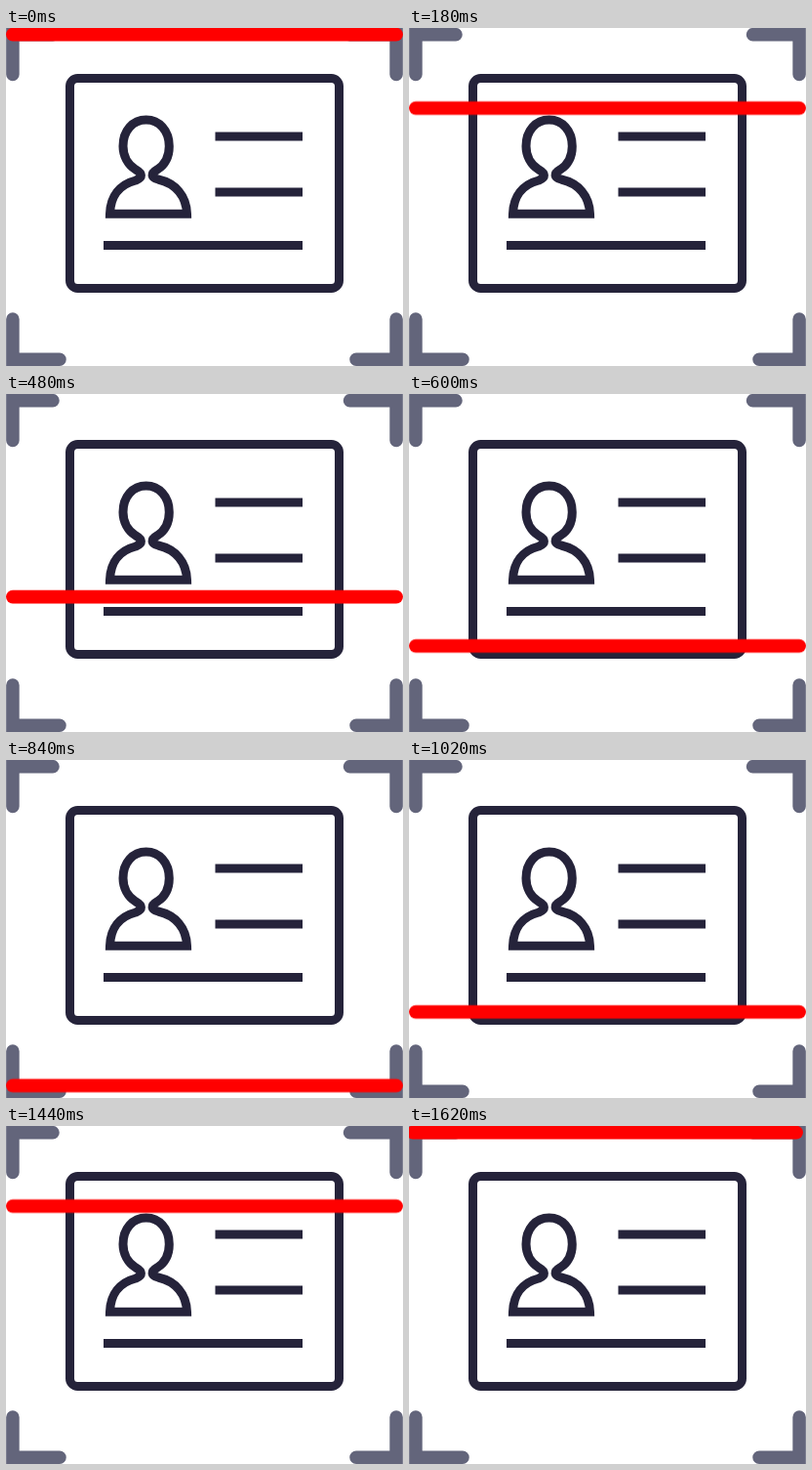
An HTML page for the animation above (1.65 s loop, 407x346 px).

```html
<!DOCTYPE html>
<html lang="en">
<head>
<meta charset="utf-8">
<title>ID card scan</title>
<style>
  html, body { margin: 0; width: 100%; height: 100%; overflow: hidden; background: #fff; }
  svg { display: block; width: 407px; height: 346px; }
  .corners, .card { fill: none; }
  .corners { stroke: #63657b; stroke-width: 13.5; stroke-linecap: round; }
  .card { stroke: #25233a; stroke-width: 9; }
  .beam { fill: #f00; animation: scan 1650ms infinite; }

  /* 27 steps down, 27 steps up, then one short rest nudged to the left */
  @keyframes scan {
    0% { transform: translate(0, 0); animation-timing-function: steps(27); }
    49.09% { transform: translate(0, 339.2px); animation-timing-function: steps(27); }
    98.18% { transform: translate(0, 0); animation-timing-function: step-start; }
    100% { transform: translate(-3px, 0); }
  }
</style>
</head>
<body>
<svg viewBox="0 0 407 346">
  <g class="corners">
    <path d="M48 6.7H6.9V47.5"/>
    <path d="M352.5 6.7H400.1V47.5"/>
    <path d="M6.9 298V339.2H55"/>
    <path d="M400.1 298V339.2H359"/>
  </g>
  <g class="card">
    <rect x="65.5" y="51.5" width="276" height="215" rx="8"/>
    <path d="M214.5 111H304M214.5 168H304M100 222.5H304"/>
    <path d="M106.5 190.3H185.5C185 172 174 159 156 155C148.500 153 148 149 155 145
             C163 140 167.300 131 167.300 121C167.300 105 157 94 143.700 94
             C130 94 120 105 120 121C120 131 125 140 133 145
             C140 149 140.500 153 133 156C117 160 107 172 106.500 190.300Z"/>
  </g>
  <rect class="beam" x="0" y="-0.3" width="407" height="13.800" rx="6.900"/>
</svg>
</body>
</html>
```
